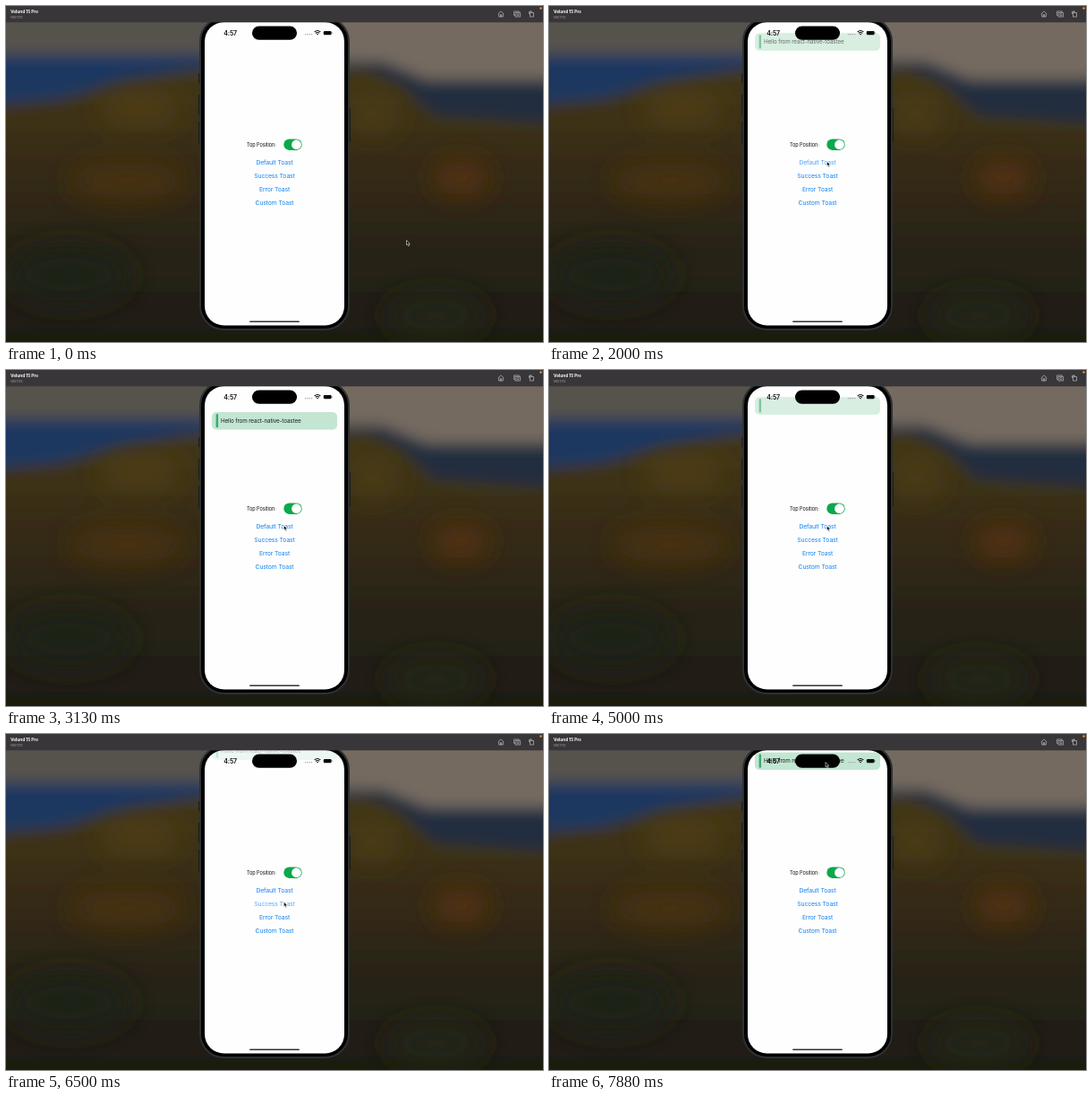
An HTML page that plays this animation: 600x375 px, repeating every 8 s.

```html
<!DOCTYPE html>
<html lang="en">
<head>
<meta charset="utf-8">
<title>Toast demo</title>
<style>
  html, body { margin: 0; width: 100%; height: 100%; overflow: hidden; background: #1e1a10; }
  svg { display: block; width: 100vw; height: 100vh; }
  text { font-family: Inter, Roboto, sans-serif; letter-spacing: -.02em; }
  .link { font-size: 6.85px; fill: #1182f3; text-anchor: middle; }
  .icon { fill: none; stroke: #bdbbbe; stroke-width: .7; stroke-linejoin: round; }
</style>
</head>
<body>
<svg viewBox="0 0 600 375">
  <defs>
    <linearGradient id="land" gradientUnits="userSpaceOnUse" x1="0" y1="70" x2="0" y2="375">
      <stop offset="0" stop-color="#443818"/>
      <stop offset=".35" stop-color="#362b16"/>
      <stop offset=".7" stop-color="#262214"/>
      <stop offset="1" stop-color="#1e1b11"/>
    </linearGradient>
    <filter id="soft" filterUnits="userSpaceOnUse" x="-60" y="-60" width="720" height="500"><feGaussianBlur stdDeviation="8"/></filter>
    <filter id="softer" filterUnits="userSpaceOnUse" x="-60" y="-60" width="720" height="500"><feGaussianBlur stdDeviation="15"/></filter>
    <filter id="glow" x="-5%" y="-30%" width="110%" height="160%"><feGaussianBlur stdDeviation=".6"/></filter>
    <clipPath id="screen"><rect x="222" y="18" width="156" height="338.5" rx="21.5"/></clipPath>
  </defs>

  <!-- blurred landscape -->
  <g filter="url(#soft)">
    <path d="M-60-60H300V60H-60Z" fill="#56534e"/>
    <path d="M-60 54H300V120H-60Z" fill="#1e3860"/>
    <path d="M300-60H660V84H300Z" fill="#746a61"/>
    <path d="M300 62H420L470 82H660V150H300Z" fill="#202e41"/>
    <path d="M-60 114L60 104L130 84L215 70H400L440 88L480 122L660 134V440H-60Z" fill="url(#land)"/>
  </g>
  <g filter="url(#softer)">
    <ellipse cx="150" cy="115" rx="45" ry="14" fill="#523f15"/>
    <ellipse cx="410" cy="120" rx="28" ry="20" fill="#4c3d18"/>
    <ellipse cx="135" cy="195" rx="65" ry="20" fill="#48300f"/>
    <ellipse cx="508" cy="192" rx="32" ry="18" fill="#573011"/>
    <ellipse cx="70" cy="300" rx="70" ry="35" fill="#1d2113"/>
    <ellipse cx="480" cy="345" rx="55" ry="25" fill="#212817"/>
  </g>

  <!-- phone -->
  <g fill="#1c1d1c">
    <rect x="215" y="75" width="2" height="11"/>
    <rect x="215" y="99" width="2" height="23"/>
    <rect x="215" y="129" width="2" height="25"/>
    <rect x="383" y="114" width="2" height="38"/>
  </g>
  <rect x="217" y="13" width="166" height="348" rx="26.5" fill="#000" stroke="#2d3133" stroke-width="2"/>

  <g clip-path="url(#screen)">
    <rect x="222" y="18" width="156" height="339" fill="#fefefe"/>
    <text x="269" y="156.5" font-size="5.6" fill="#111">Top Position:</text>
    <rect x="310.3" y="148.5" width="20.4" height="12.4" rx="6.2" fill="#0ba84b"/>
    <circle cx="324.5" cy="154.7" r="5.4" fill="#fff"/>
    <text class="link" id="defaultLink" x="300" y="176.5">Default Toast</text>
    <text class="link" id="successLink" x="300" y="191.5">Success Toast</text>
    <text class="link" x="300" y="206.5">Error Toast</text>
    <text class="link" x="300" y="221.5">Custom Toast</text>
    <rect x="272" y="351.4" width="56" height="1.6" rx=".8" fill="#333"/>

    <g id="toast">
      <rect x="230" width="140" height="19.5" rx="5" fill="#c3e6d3" filter="url(#glow)"/>
      <rect x="230.4" y=".4" width="139.2" height="18.8" rx="4.5" fill="#c3e6d3"/>
      <rect x="234.6" y="2" width="2.5" height="15.3" rx="1" fill="#3fa872"/>
      <text id="message" x="240" y="11.9" font-size="6.3" fill="#18201c">Hello from react-native-toastee</text>
    </g>

    <rect x="275" y="22.6" width="50" height="15.2" rx="7.6" fill="#000"/>
    <text x="250.6" y="32.7" font-size="7" font-weight="600" text-anchor="middle" fill="#0b0b0b">4:57</text>
    <path d="M334 31.6H342.5" stroke="#aaa" stroke-width="1.2" stroke-dasharray="1.3 1"/>
    <path d="M344.7 29Q348 26 351.3 29M346 30.4Q348 28.6 350 30.4" fill="none" stroke="#0b0b0b" stroke-width="1.1"/>
    <path d="M346.9 31.4Q348 30.5 349.1 31.4L348 32.6Z" fill="#0b0b0b"/>
    <rect x="354.8" y="27.9" width="8.8" height="4.4" rx="1.3" fill="#0b0b0b"/>
    <rect x="364" y="29.3" width=".6" height="1.6" fill="#888"/>
  </g>

  <!-- title bar -->
  <rect width="600" height="18.3" fill="#393639"/>
  <text x="5" y="8.3" font-size="4.9" font-weight="700" fill="#f4f3f4">Velund 15 Pro</text>
  <text x="5" y="13.6" font-size="4.1" fill="#aaa8ab">Vel 17.0</text>
  <g class="icon">
    <path d="M549.7 9L553 5.9L556.3 9M550.7 8.4V12H555.3V8.4M552.4 12V9.7H553.6V12"/>
    <path d="M568.9 10.4H567.6V6H573.2V7.2M569 7.4H574.6V12H569Z"/>
    <circle cx="571.8" cy="9.7" r="1.1"/>
    <path d="M585.5 7.5H589.5V12H585.5ZM584.5 9V6.3H587.2M586.2 5.1L587.4 6.3L586.2 7.5"/>
  </g>
  <circle cx="597.5" cy="2.5" r="1.2" fill="#f19a28"/>

  <path id="cursor" d="M0 0V5.3L1.2 4.2L2.1 6.3L3.1 5.9L2.2 3.8H3.8Z" fill="#050505" stroke="#fff" stroke-width=".55"/>
</svg>

<script>
const LOOP = 8000, STEP = 125;
const HIDDEN_TOP = -20, SHOWN_TOP = 47;
const FIRST_TAP = 1750, DISMISS = 4875, SECOND_TAP = 6375, DRAG = 7750;

const $ = id => document.getElementById(id);
const progress = (t, start, length) => Math.min(1, Math.max(0, (t - start) / length));
const easeIn = p => p * p;
const easeOut = p => 1 - (1 - p) ** 2;
const smooth = p => p * p * (3 - 2 * p);
const mix = (a, b, p) => a + (b - a) * p;

// The pointer glides from one resting place to the next.
const rest = { x: 447.5, y: 261.5 };
const glides = [
  { start: 125, length: 375, x: 366, y: 216 },
  { start: 625, length: 375, x: 288, y: 174 },
  { start: 1000, length: 250, x: 310.5, y: 173.5 },
  { start: DISMISS, length: 1250, x: 310.5, y: 187.5 },
  { start: 6625, length: 750, x: 309, y: 58 },
  { start: DRAG, length: STEP, x: 309, y: 31.5 }
];

function pointerAt(t) {
  return glides.reduce((from, to) => {
    const p = smooth(progress(t, to.start, to.length));
    return { x: mix(from.x, to.x, p), y: mix(from.y, to.y, p) };
  }, rest);
}

const enter = (t, start) => easeOut(progress(t, start, 500));
const tapFade = (t, start) => t < start ? 1 : mix(.65, 1, progress(t, start, 1000));

function place(id, x, y) {
  $(id).setAttribute("transform", `translate(${x} ${y})`);
}
function fade(id, opacity) {
  $(id).setAttribute("opacity", opacity);
}

function draw(now) {
  // The picture advances eight times a second.
  const tick = Math.min(Math.floor((now % LOOP + 5) / STEP), LOOP / STEP - 1);
  const t = tick * STEP;

  const pointer = pointerAt(t);
  place("cursor", pointer.x, pointer.y);

  const leave = easeIn(progress(t, DISMISS, 250));
  const shown = enter(t, FIRST_TAP) - leave + enter(t, SECOND_TAP);
  const dragged = t > DRAG ? pointer.y - 58 : 0;
  place("toast", 0, mix(HIDDEN_TOP, SHOWN_TOP, shown) + dragged);
  fade("toast", shown ** 1.5);
  fade("message", leave > 0 && t < SECOND_TAP ? 0 : 1);

  fade("defaultLink", tapFade(t, FIRST_TAP));
  fade("successLink", tapFade(t, SECOND_TAP));
}

const start = performance.now();
function loop() {
  draw(performance.now() - start);
  requestAnimationFrame(loop);
}
loop();
</script>
</body>
</html>
```
